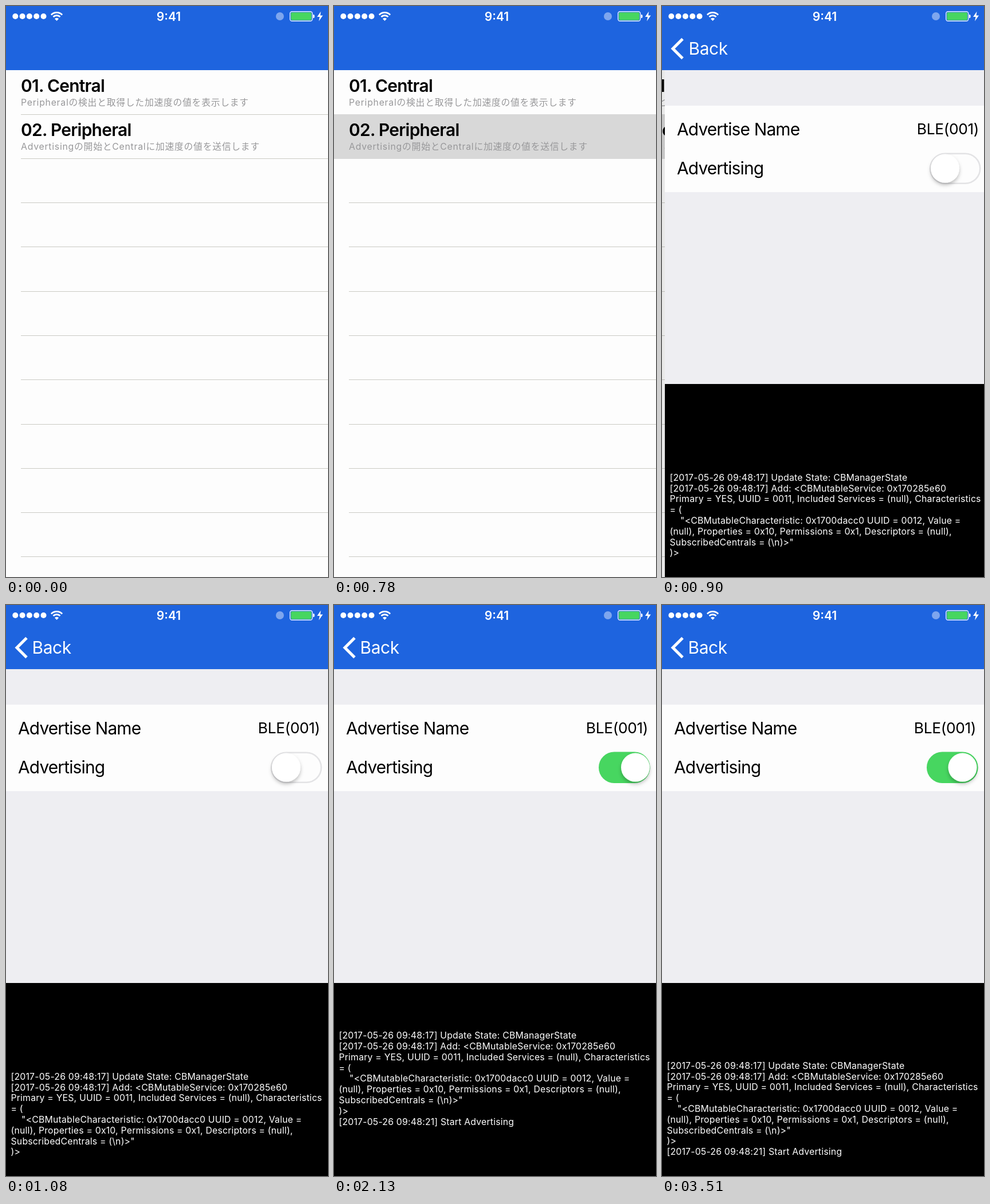
An HTML page for the animation above (3.54 s loop, 562x997 px).

```html
<!DOCTYPE html>
<html lang="ja">
<head>
<meta charset="utf-8">
<style>
html, body { margin: 0; width: 562px; height: 997px; overflow: hidden; background: #fdfdfd; }
svg { display: block; font-family: Inter, "Noto Sans CJK JP", "Noto Sans CJK", sans-serif; }
text { white-space: pre; }
.title { font-size: 29.86px; font-weight: 600; letter-spacing: -.7px; }
.detail { font-size: 15.8px; letter-spacing: .75px; fill: #98989a; }
.label { font-size: 29.86px; letter-spacing: -.82px; }
.value { font-size: 26.3px; letter-spacing: -.35px; }
.log { font-size: 15.8px; letter-spacing: .2px; fill: #fff; }
</style>
</head>
<body>
<svg width="562" height="997" viewBox="0 0 562 997">
  <defs>
    <filter id="shadow" x="-30%" y="-30%" width="160%" height="170%">
      <feDropShadow dx="0" dy="4" stdDeviation="3" flood-opacity=".25"/>
    </filter>
  </defs>

  <g id="list">
    <rect width="562" height="997" fill="#fdfdfd"/>
    <g id="lines" fill="#cacac4"></g>
    <rect id="highlight" y="189" width="562" height="78" fill="#d8d8d8"/>
    <text class="title" x="26" y="149.5">01. Central</text>
    <text class="detail" x="26" y="173.5">Peripheralの検出と取得した加速度の値を表示します</text>
    <text class="title" x="26" y="226.8">02. Peripheral</text>
    <text class="detail" x="26" y="250.8">Advertisingの開始とCentralに加速度の値を送信します</text>
  </g>
  <rect id="dim" width="562" height="997"/>

  <g id="page">
    <rect width="562" height="997" fill="#eeeef2"/>
    <rect y="174" width="562" height="151" fill="#fdfdfd"/>
    <text class="label" x="21" y="226">Advertise Name</text>
    <text class="value" x="548" y="224" text-anchor="end">BLE(001)</text>
    <text class="label" x="21" y="294">Advertising</text>
    <rect x="463.2" y="257.8" width="87" height="52" rx="26" fill="#fdfdfd" stroke="#e3e3e5" stroke-width="2.6"/>
    <rect id="green" x="462" y="256.5" width="89.6" height="54.5" rx="27.2" fill="#47d660"/>
    <circle id="knob" cy="283.6" r="25" fill="#fff" filter="url(#shadow)"/>
    <rect y="660" width="562" height="337"/>
    <text id="log" class="log"></text>
  </g>

  <rect width="562" height="112" fill="#1e64df"/>
  <g id="back" fill="#fff">
    <path d="M36 57.5 19 74.5 36 91.5" fill="none" stroke="#fff" stroke-width="5"/>
    <text id="backText" x="45.5" y="84.5" font-size="29.86" letter-spacing="-.4">Back</text>
  </g>

  <g fill="#fff">
    <g id="signal"></g>
    <g fill="none" stroke="#fff" stroke-width="2.8">
      <path d="M78.9 15.4a13.6 13.6 0 0 1 19.2 0M82.5 19a8.5 8.5 0 0 1 12 0"/>
    </g>
    <path d="M88.5 26 84.9 22.2a5 5 0 0 1 7.2 0z"/>
    <text x="284" y="25.6" font-size="21" font-weight="600" text-anchor="middle">9:41</text>
    <circle cx="478" cy="18" r="7" fill="#7ea6ee"/>
    <rect x="495.7" y="9.7" width="39" height="16.6" rx="3.5" fill="none" stroke="#e6f0ff" stroke-width="1.4"/>
    <rect x="497.3" y="11.3" width="35.8" height="13.4" rx="2" fill="#47d660"/>
    <path d="M536 15h1q1.500 0 1.500 3t-1.500 3h-1z"/>
    <path d="M549.500 9.500 543 19h4.500l-1.500 7.500 7-10h-4.500z"/>
  </g>
</svg>

<script>
const $ = id => document.getElementById(id);
const set = (id, attrs) => {
  for (const k in attrs) $(id).setAttribute(k, attrs[k]);
};
const add = (parent, tag, attrs, text = '') => {
  const el = document.createElementNS('http://www.w3.org/2000/svg', tag);
  for (const k in attrs) el.setAttribute(k, attrs[k]);
  el.textContent = text;
  return $(parent).appendChild(el);
};
const clamp = v => Math.min(1, Math.max(0, v));
const smooth = v => v * v * (3 - 2 * v);

const LOOP = 3540, TAP = 690, PUSH = 790, TOGGLE = 2040, APPEND = 2066;

for (let i = 1; i < 12; i++)
  add('lines', 'rect', { x: 26, y: Math.floor(111.9 + 77.27 * i), width: 536, height: 1 });
for (let i = 0; i < 5; i++)
  add('signal', 'circle', { cx: 16.3 + 12.3 * i, cy: 18, r: 5 });

const logLines = String.raw`[2017-05-26 09:48:17] Update State: CBManagerState
[2017-05-26 09:48:17] Add: <CBMutableService: 0x170285e60
Primary = YES, UUID = 0011, Included Services = (null), Characteristics
= (
    "<CBMutableCharacteristic: 0x1700dacc0 UUID = 0012, Value =
(null), Properties = 0x10, Permissions = 0x1, Descriptors = (null),
SubscribedCentrals = (\n)>"
)>
[2017-05-26 09:48:21] Start Advertising`.split('\n')
  .map((line, i) => add('log', 'tspan', { x: 8.5, y: 5.7 + 18.8 * i }, line));
const lastLine = logLines[logLines.length - 1];

function draw(t) {
  // critically damped push with a parallax list beneath
  const s = Math.max(0, (t - PUSH) * .061);
  let rest = (1 + s) * Math.exp(-s);
  if (rest < .0008) rest = 0;
  set('list', { transform: `translate(${-168.6 * (1 - rest)})` });
  set('highlight', { opacity: t >= TAP ? 1 : 0 });
  set('dim', { opacity: .08 * (1 - rest) });
  set('page', { transform: `translate(${562 * rest})` });
  set('back', { opacity: 1 - rest });
  set('backText', { transform: `translate(${120 * rest})` });

  // the knob springs slightly past its end
  const u = Math.max(0, t - TOGGLE), w = u * Math.PI / 90;
  const slide = 1 - Math.exp(-w) * (Math.cos(w) + Math.sin(w));
  set('knob', { cx: 489 + 35.5 * slide });
  set('green', { opacity: clamp(u / 60) });

  // a new line resets the log, which then scrolls to its end
  const on = t >= APPEND;
  const y = on ? 684 + 120 * smooth(clamp((t - APPEND) / 120)) : 823;
  set('log', { transform: `translate(0 ${y})` });
  lastLine.setAttribute('visibility', on ? 'visible' : 'hidden');
}

const start = performance.now();
function tick() {
  draw((performance.now() - start) % LOOP);
  requestAnimationFrame(tick);
}
tick();
</script>
</body>
</html>
```
